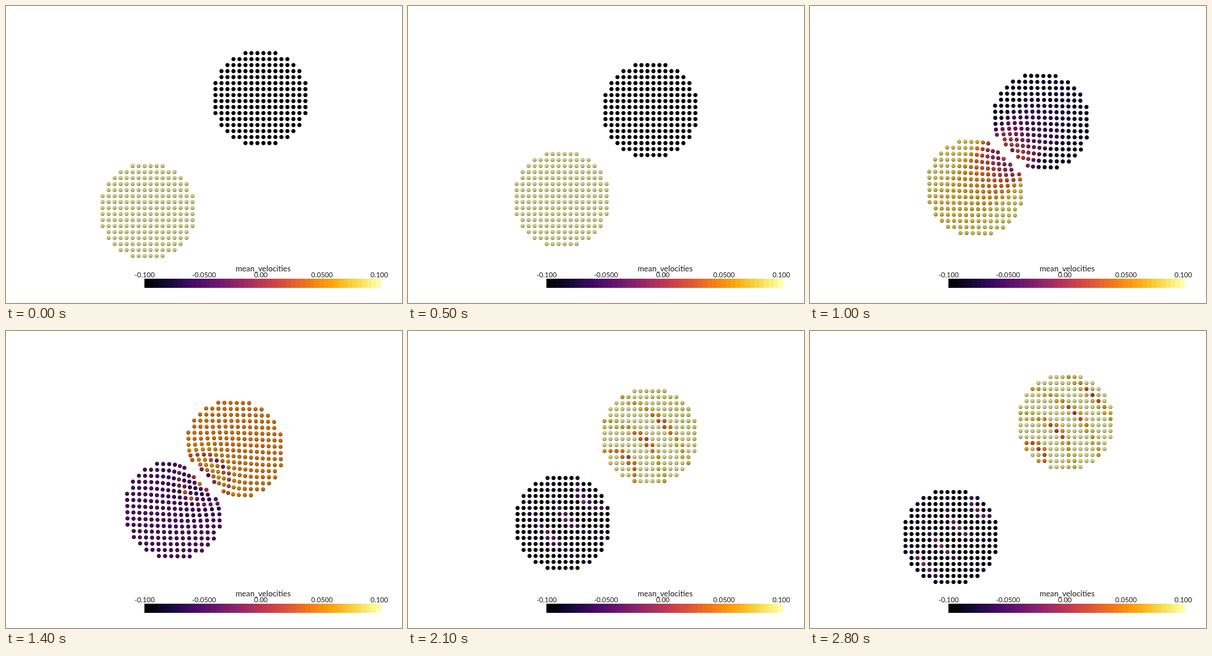
An HTML page that plays this animation: 864 by 648 pixels, repeating every 2900 ms.

```html
<!DOCTYPE html>
<html lang="en">
<head>
<meta charset="utf-8">
<title>Colliding discs</title>
<style>
  html, body { margin: 0; width: 100%; height: 100%; overflow: hidden; background: #fff; }
  svg { display: block; width: 864px; height: 648px; }
  text { font-family: Lato, "Open Sans", sans-serif; fill: #1c1c1c; text-anchor: middle; }
</style>
</head>
<body>
<svg id="stage" viewBox="0 0 864 648" xmlns="http://www.w3.org/2000/svg">
  <defs>
    <radialGradient id="shade" cx=".45" cy=".33" r=".72">
      <stop offset="0" stop-opacity=".14"/>
      <stop offset=".5" stop-opacity=".24"/>
      <stop offset=".8" stop-opacity=".46"/>
      <stop offset="1" stop-opacity=".7"/>
    </radialGradient>
  </defs>
  <g id="dots"></g>
  <g id="bar" shape-rendering="crispEdges"></g>
  <g id="labels"></g>
</svg>
<script>
const NS = 'http://www.w3.org/2000/svg';
const STEP = 100, STEPS = 29;
const GAP = 13.08, RADIUS = 4.45, TIP = 7.8;
const SPEED_IN = 5.24, SPEED_OUT = 4.38, TURN = 12.5, TURN_X = 374.4, SOFT = 11;
const HIT = 9, WAVE_SPEED = 1.05, WAVE_LENGTH = 4.15;

const inferno = ['000004', '160b39', '420a68', '6a176e', '932667', 'bc3754',
  'dd513a', 'f37819', 'fca50a', 'f6d746', 'fcffa4']
  .map(hex => [0, 2, 4].map(i => parseInt(hex.substr(i, 2), 16)));

const mix = (a, b, f) => a + (b - a) * f;
const bell = (d, w) => Math.exp(-d * d / (w * w));
const softPlus = (x, w) => w * Math.log1p(Math.exp(x / w));
const sigmoid = x => 1 / (1 + Math.exp(-x));
const byId = id => document.getElementById(id);

function add(parent, tag, attrs) {
  const el = document.createElementNS(NS, tag);
  for (const name in attrs) el.setAttribute(name, attrs[name]);
  return parent.appendChild(el);
}

function colour(v) {
  const p = Math.min(1, Math.max(0, v / .2 + .5)) * 10;
  const i = Math.min(9, Math.floor(p));
  const rgb = inferno[i].map((c, n) => Math.round(mix(c, inferno[i + 1][n], p - i)));
  return `rgb(${rgb})`;
}

// straight approach, rounded turn, straight retreat
function centre(k) {
  const d = k - TURN;
  return TURN_X + SPEED_IN * d - softPlus((SPEED_IN + SPEED_OUT) * d, SOFT);
}

// how far the disc's edge at t would reach past the flat contact face
function overlap(k, t) {
  const face = (432 - centre(k)) * Math.SQRT2 - GAP;
  return softPlus(Math.sqrt(TIP * TIP - Math.min(t * t, 60)) * GAP - face, 4);
}

function dent(k, s, t) {
  const edge = Math.sqrt(TIP * TIP - Math.min(t * t, 60));
  return -overlap(k, t) * Math.exp((s - edge) / 5);
}

// body speed, loading at the face, then a ring wave that spreads from the contact
function velocity(k, s, t) {
  const body = (centre(k + .5) - centre(k - .5)) / 48;
  const loading = Math.min(0, dent(k + .5, s, t) - dent(k - .5, s, t)) / 46;
  const r = Math.hypot(TIP - s, .8 * t);
  const phase = 2 * Math.PI * (r - TIP - WAVE_SPEED * (k - 18)) / WAVE_LENGTH;
  const reached = sigmoid((WAVE_SPEED * (k - HIT) - r) / .5);
  const crest = Math.max(0, Math.cos(phase)) ** 2;
  const wave = reached * (.1 * crest * (.35 + .65 * bell(t, 2.2)) - .015);
  const face = .08 * bell(s - 8, .8) * bell(t, 5) * bell(k - 14, 5);
  return body + loading + wave + face;
}

function makeDot() {
  const g = add(byId('dots'), 'g', {});
  const ball = add(g, 'circle', { r: RADIUS });
  add(g, 'circle', { r: RADIUS, fill: 'url(#shade)' });
  return { g, ball };
}

function setDot(dot, x, y, v) {
  dot.g.setAttribute('transform', `translate(${x.toFixed(2)} ${y.toFixed(2)})`);
  dot.ball.setAttribute('fill', colour(v));
}

// s runs towards the other disc, t across
const points = [];
for (let b = -7.5; b < 8; b++) {
  for (let a = -7.5; a < 8; a++) {
    if (a * a + b * b > 64) continue;
    points.push({ a, b, s: (a - b) * Math.SQRT1_2, t: (a + b) * Math.SQRT1_2,
      left: makeDot(), right: makeDot() });
  }
}

for (let i = 0; i < 50; i++) {
  add(byId('bar'), 'rect', { x: 302 + i * 10.31, y: 595, width: 10.31, height: 20,
    fill: colour(-.1 + .2 * i / 49) });
}

function label(str, x, y, size) {
  add(byId('labels'), 'text', { x, y, 'font-size': size }).textContent = str;
}
label('mean_velocities', 561, 578.5, 17.2);
[['-0.100', 302.5], ['-0.0500', 432], ['0.00', 556], ['0.0500', 689.5], ['0.100', 814.5]]
  .forEach(([str, x]) => label(str, x, 591.5, 15));

// the right disc is the left one turned half a circle, with opposite velocity
function draw(k) {
  const cx = centre(k);
  const spread = .0022 * overlap(k, 0) * GAP;
  for (const { a, b, s, t, left, right } of points) {
    const ds = dent(k, s, t), dt = spread * t;
    const x = cx + a * GAP + (ds + dt) * Math.SQRT1_2;
    const y = 756 - cx + b * GAP + (dt - ds) * Math.SQRT1_2;
    const v = velocity(k, s, t);
    setDot(left, x, y, v);
    setDot(right, 864 - x, 648 - y, -v);
  }
}

let shown = -1;
function tick() {
  const k = Math.floor(performance.now() / STEP) % STEPS;
  if (k !== shown) draw(shown = k);
  requestAnimationFrame(tick);
}
tick();
</script>
</body>
</html>
```
